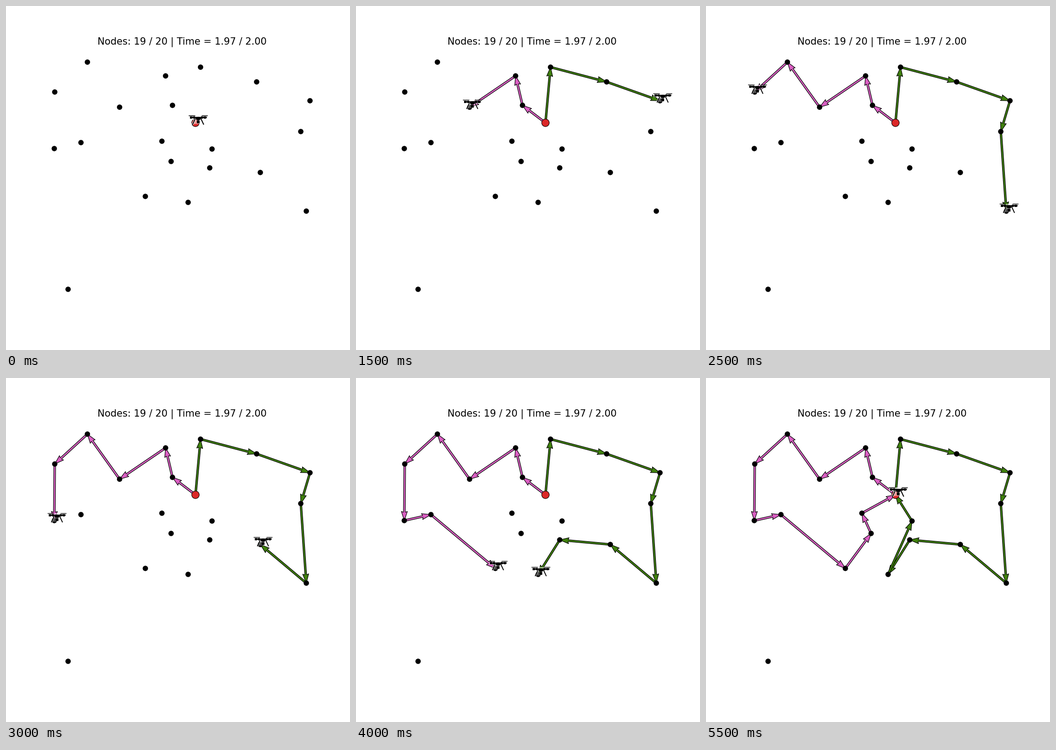
A matplotlib script for the animation above (6.5 s loop, 748 by 748 pixels).

```python
import matplotlib.pyplot as plt
import numpy as np
from matplotlib.animation import FuncAnimation
from matplotlib.lines import Line2D
from matplotlib.patches import Circle, Ellipse, Polygon, Rectangle
from matplotlib.transforms import Affine2D

SIZE, DPI = 748, 100
PX = 72 / DPI  # points per pixel
STEP_MS, STEPS = 500, 13

PINK, GREEN, RED = "#da5fc3", "#40810e", "#db2828"

# Waypoints as x + y*1j in pixels, y pointing down.
DEPOT = 412 + 254j
LEFT = [362 + 216j, 347 + 152j, 247 + 220j, 177 + 122j, 106 + 187j,
        105 + 310j, 163 + 297j, 303 + 414j, 359 + 338j, 339 + 294j]
RIGHT = [423 + 133j, 545 + 165j, 661 + 206j, 641 + 273j, 653 + 446j,
         553 + 362j, 443 + 352j, 396 + 427j, 448 + 311j]
UNVISITED = 135 + 616j
DRONE_SHIFT = 5.7 - 6.5j

fig = plt.figure(figsize=(SIZE / DPI, SIZE / DPI), dpi=DPI, facecolor="white")
ax = fig.add_axes([0, 0, 1, 1])
ax.set(xlim=(0, SIZE), ylim=(SIZE, 0))
ax.axis("off")
ax.text(383, 83, "Nodes: 19 / 20 | Time = 1.97 / 2.00", fontsize=15,
        family="DejaVu Sans", ha="center", va="baseline")


def xy(z):
    return np.real(z), np.imag(z)


def arrow(start, end, color, width=4):
    """Arrow with a slightly swept head, its tip on the end point."""
    length = abs(end - start)
    along = (end - start) / length
    half = np.array([0.5j * width,
                     length + (-4.5 + 0.5j) * width,
                     length + (-5 + 1.65j) * width])
    outline = np.concatenate([half, [length], half[::-1].conj()])
    points = np.column_stack(xy(start + along * outline))
    return ax.add_patch(Polygon(points, fc=color, ec="black", lw=1.2 * PX,
                                joinstyle="miter", zorder=2, visible=False))


def drone_parts():
    """Drone seen from the side, centred on the origin; s mirrors it."""
    def line(xs, ys, width, color="black", alpha=1):
        return Line2D(xs, ys, lw=width * PX, color=color, alpha=alpha,
                      solid_capstyle="butt")

    def box(x, y, w, h, color="black", alpha=1):
        return Rectangle((x - w / 2, y), w, h, fc=color, alpha=alpha)

    parts = [box(0, -10, 40, 8, "white", 0.5),
             Polygon([(-5, -2), (5, -2), (9, 9), (-9, 9)],
                     fc="white", alpha=0.3)]
    for s in (-1, 1):
        leg = [s * 6, s * 12.2], [-3, 10.4]
        parts += [line(*leg, 4.5, "white", 0.55),
                  line(*leg, 1.9),
                  line([s * 7, s * 20.3], [-9.2, -9.2], 1.3),
                  line([s * 8, s * 19], [-7.7, -7.7], 1, "#999999"),
                  box(s * 8.5, -8, 3.6, 5),
                  box(s * 15, -8, 5, 5)]
    return parts + [line([-18, 18], [-5.5, -5.5], 2.6),
                    Ellipse((0.3, -2.8), 10.5, 7.6, fc="black"),
                    box(0.4, 1, 6.8, 6.2)]


class Drone:
    def __init__(self, route, color, z):
        self.stops = [DEPOT, *route, DEPOT]
        self.arrows = [arrow(a, b, color)
                       for a, b in zip(self.stops, self.stops[1:])]
        self.parts = drone_parts()
        for part in self.parts:
            part.set_zorder(z)
            ax.add_artist(part)

    def show(self, step):
        """One leg per step, then wait at the depot."""
        done = min(step, len(self.arrows))
        for k, shape in enumerate(self.arrows):
            shape.set_visible(k < done)
        place = Affine2D().translate(*xy(self.stops[done] + DRONE_SHIFT))
        for part in self.parts:
            part.set_transform(place + ax.transData)


for node in LEFT + RIGHT + [UNVISITED]:
    ax.add_patch(Circle(xy(node), 5.8, fc="black", ec="none", zorder=3))
ax.add_patch(Circle(xy(DEPOT), 8.2, fc=RED, ec="black", lw=1.1 * PX, zorder=3))
drones = [Drone(LEFT, PINK, 4), Drone(RIGHT, GREEN, 5)]


def update(step):
    for drone in drones:
        drone.show(step)
    return []


anim = FuncAnimation(fig, update, frames=STEPS, interval=STEP_MS,
                     init_func=lambda: update(0), repeat=True, repeat_delay=0)
plt.show()
```
